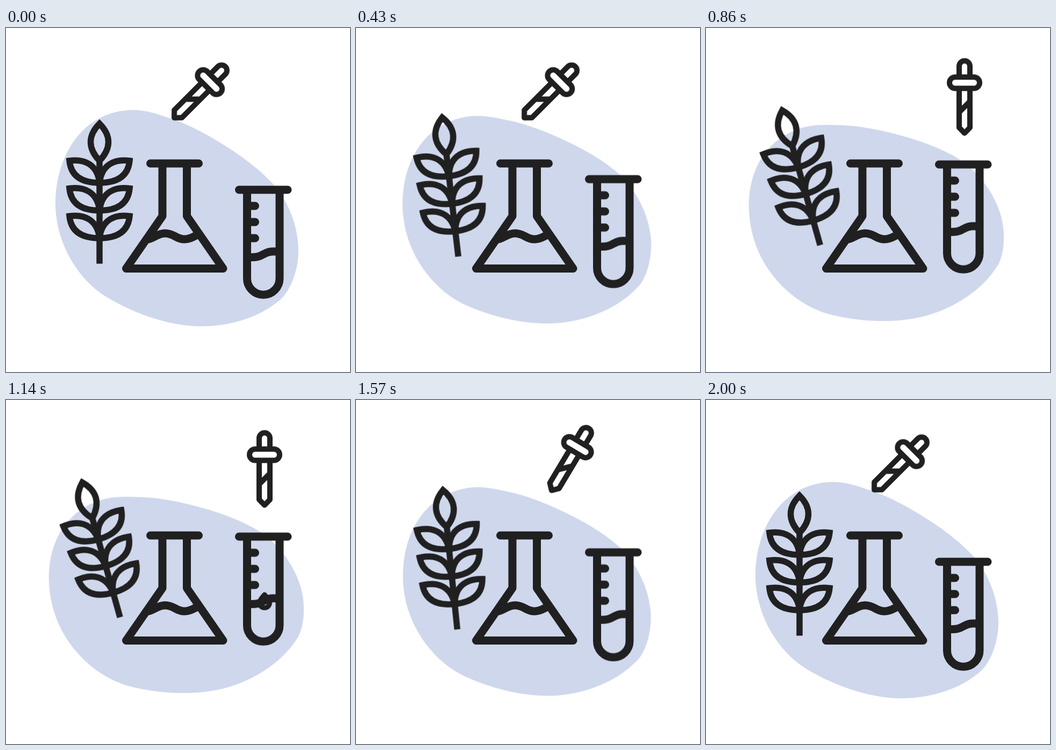
Animation of 640 by 640 pixels, one loop 2070 ms. Source, as an HTML page:

```html
<!DOCTYPE html>
<html lang="en">
<head>
<meta charset="utf-8">
<title>Laboratory</title>
<style>
  html, body { margin: 0; width: 100%; height: 100%; overflow: hidden; background: #fff; }
  svg { display: block; width: 100%; height: 100%; }

  .ink { fill: none; stroke: #202021; stroke-width: 15; stroke-linecap: round; stroke-linejoin: round; }
  .plant { stroke-width: 11.5; stroke-linecap: butt; stroke-linejoin: miter; }
  .thin { stroke-width: 10; }

  .blob, .plant, .tube, .lift, .swing, .drop { animation: 2.07s linear infinite both; }
  .blob { transform-origin: 318px 368px; animation-name: turn; }
  .plant { transform-origin: 174px 304px; animation-name: sway; }
  .tube { animation-name: rise; }
  .lift { animation-name: lift; }
  .swing { animation-name: swing; }
  .drop { stroke-width: 9; animation-name: fall; }
  .first { --x: 313px; --from: 178px; --to: 404.5px; }
  .second { --x: 481px; --from: 208px; --to: 392px; animation-delay: .87s; }

  /* out until 990 ms, back until 1980 ms */
  @keyframes turn {
    0% { transform: none; animation-timing-function: cubic-bezier(.543, 0, .375, 1); }
    47.83% { transform: rotate(-17.5deg); animation-timing-function: cubic-bezier(.625, 0, .457, 1); }
    95.65%, 100% { transform: none; }
  }
  @keyframes sway {
    0% { transform: translate(0, 0) rotate(0deg); animation-timing-function: cubic-bezier(.543, 0, .375, 1); }
    47.83% { transform: translate(2px, -30px) rotate(-16deg); animation-timing-function: cubic-bezier(.625, 0, .457, 1); }
    95.65%, 100% { transform: translate(0, 0) rotate(0deg); }
  }
  @keyframes rise {
    0% { transform: translateY(0); animation-timing-function: cubic-bezier(.543, 0, .375, 1); }
    47.83% { transform: translateY(-48px); animation-timing-function: cubic-bezier(.625, 0, .457, 1); }
    95.65%, 100% { transform: translateY(0); }
  }

  /* the dropper hops across 420-820 ms and returns 1350-1750 ms */
  @keyframes swing {
    0% { transform: translateX(357px) rotate(45deg); }
    20.29% { transform: translateX(357px) rotate(45deg); animation-timing-function: cubic-bezier(.543, 0, .375, 1); }
    39.61% { transform: translateX(481px) rotate(0deg); }
    65.22% { transform: translateX(481px) rotate(0deg); animation-timing-function: cubic-bezier(.543, 0, .375, 1); }
    84.54%, 100% { transform: translateX(357px) rotate(45deg); }
  }
  @keyframes lift {
    0% { transform: translateY(123px); }
    20.29% { transform: translateY(123px); animation-timing-function: cubic-bezier(.55, 0, .85, 1); }
    31.4% { transform: translateY(111.5px); animation-timing-function: cubic-bezier(.6, 0, .65, 1); }
    39.61% { transform: translateY(133.3px); }
    65.22% { transform: translateY(133.3px); animation-timing-function: cubic-bezier(.45, 0, .55, 1); }
    72.46% { transform: translateY(111.5px); animation-timing-function: cubic-bezier(.3, 0, .45, 1); }
    84.54%, 100% { transform: translateY(123px); }
  }
  @keyframes fall {
    0% { transform: translate(var(--x), var(--from)) scale(0); }
    3.4% { transform: translate(var(--x), var(--from)) scale(1); animation-timing-function: ease-in; }
    13.8% { transform: translate(var(--x), var(--to)) scale(1); }
    16.5%, 100% { transform: translate(var(--x), var(--to)) scale(0); }
  }
</style>
</head>
<body>
<svg viewBox="0 0 640 640">
  <defs>
    <path id="leaf" d="M118 247C146 243 170 254 174 288C143 288 121 277 118 247Z"/>
    <g id="pair">
      <use href="#leaf"/>
      <use href="#leaf" transform="matrix(-1 0 0 1 348 0)"/>
    </g>
    <path id="bead" d="M0-12C5-6 9.5-1 9.5 3A9.5 9.5 0 0 1-9.5 3C-9.5-1-5-6 0-12Z"/>
  </defs>

  <path class="blob" fill="#cfd7ec" d="M238 152.5C262 152.5 285 161 311 170C360 186 450 240 492 285C526 320 544 370 544 415C544 445 533 482 513 503C475 537 420 555 363 555C300 555 230 528 180 496C125 458 92 390 92 328C92 235 145 152.5 238 152.5Z"/>

  <g class="ink plant">
    <path d="M174 438.5V245"/>
    <path d="M174 178C152 200 152 224 174 247C196 224 196 200 174 178Z"/>
    <use href="#pair"/>
    <use href="#pair" y="51.5"/>
    <use href="#pair" y="103"/>
  </g>

  <use class="ink drop first" href="#bead"/>
  <use class="ink drop second" href="#bead"/>

  <g class="ink">
    <path d="M268.5 252H358.500M291 252V350L223.500 447.500H404L336.500 350V252"/>
    <path stroke-linecap="butt" d="M264 393C275 391 282 382 296 382C313 382 316 393 332 393C344 393 350 387 358 384"/>
  </g>

  <g class="ink tube">
    <path d="M433.500 301H524M448.500 301V466a30.250 30.250 0 0 0 60.500 0V301"/>
    <path d="M449 331H463.500M449 361H463.500M449 391H463.500"/>
    <path d="M449 426C484 430 474 412 508 416.500"/>
  </g>

  <g class="lift">
    <g class="ink thin swing">
      <path d="M-10-42V-62.250a10 10 0 0 1 20 0V-42"/>
      <rect x="-28" y="-42" width="56" height="21" rx="10.500"/>
      <path d="M-10-21V52L0 62.250L10 52V-21M-10 23.400L10 3.400"/>
    </g>
  </g>
</svg>
<script>
  // Motion plays at 14 pictures per second.
  const loop = 2070, fps = 14, last = 28;
  const anims = document.getAnimations();
  anims.forEach(a => a.pause());
  const start = performance.now();

  function tick() {
    const t = (performance.now() - start) % loop;
    const step = Math.min(last, Math.floor((t + 5) * fps / 1000));
    for (const a of anims) a.currentTime = step * 1000 / fps;
    requestAnimationFrame(tick);
  }
  tick();
</script>
</body>
</html>
```
